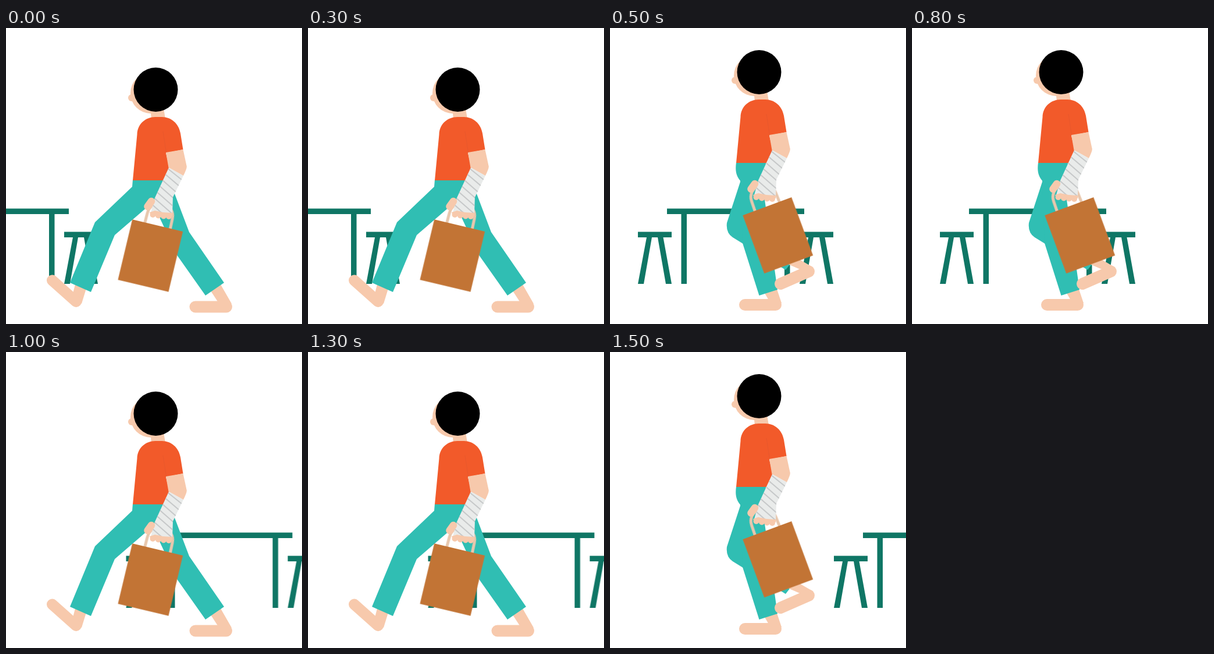
These frames come from a looping animation (509x509 px, 2000 ms). An HTML page:

```html
<!DOCTYPE html>
<html lang="en">
<head>
<meta charset="utf-8">
<title>Walking with a bag</title>
<style>
  html, body { margin: 0; width: 100%; height: 100%; overflow: hidden; background: #fff; }
  svg { display: block; width: 100%; height: 100%; }

  .skin { fill: #f7c9ac; }
  .limb { fill: none; stroke: #f7c9ac; stroke-linecap: round; }
  .pants { fill: #30beb3; }
  .shirt { fill: #f25a2a; }
  .wood { fill: #0f7665; }

  .room, .body, .bag, .stride, .pass { animation: 2s step-end infinite; }
  .room { animation-name: room; }
  .body { animation-name: bob; }
  .bag { animation-name: swing; }
  .stride { animation-name: blink; animation-duration: 1s; }
  .pass { animation-name: blink; animation-duration: 1s; animation-delay: -.5s; }
  .body, .bag { animation-duration: 1s; }

  @keyframes room {
    0% { transform: translate(-226px, 0); }
    25% { transform: translate(0, 0); }
    50% { transform: translate(158.5px, 0); }
    75%, 100% { transform: translate(337px, 0); }
  }
  @keyframes bob {
    0% { transform: translate(0, 0); }
    50%, 100% { transform: translate(-1px, -30px); }
  }
  @keyframes swing {
    0% { transform: translate(260.7px, 339.6px) rotate(13.4deg); }
    50%, 100% { transform: translate(270.2px, 306.6px) rotate(-20.3deg); }
  }
  @keyframes blink {
    0% { visibility: visible; }
    50%, 100% { visibility: hidden; }
  }
</style>
</head>
<body>
<svg viewBox="0 0 509 509">
  <defs>
    <path id="stool" d="M0 350.5H58V360H43.5L58 440H48L34 360H24L10 440H0L15 360H0Z"/>
    <path id="wrap" d="M280 240L305 254L287 291L286 319L249 317L256 292Z"/>
    <clipPath id="wrapClip"><use href="#wrap"/></clipPath>
  </defs>

  <g class="room wood">
    <use href="#stool" x="48"/>
    <use href="#stool" x="326"/>
    <path d="M98 310.5H334V320H309.5V440H300V320H132V440H122.5V320H98Z"/>
  </g>

  <g class="stride">
    <path class="skin" d="M119 441L138 448L130 474L113 464ZM352 452L369 441L388 474L378 482L365 472Z"/>
    <path class="limb" stroke-width="19" d="M79.5 434L120.500 470.500"/>
    <path class="limb" stroke-width="20" d="M325.500 479.500H379"/>
    <path class="pants" d="M218 261L217 273L153 334L110 438L146 454L187 356L252 300L295 392L343 460L375 438L315 351L290 285L278 255Z"/>
  </g>

  <g class="pass">
    <path class="pants" d="M217 231C215 246 217 255 224.500 263L201 335Q199 352 211 360L302 416L312 403L258 320Z"/>
    <path class="skin" d="M266 456L287 449L295 473L285 482L273 468ZM306 406L324 397L350 412L338 420Z"/>
    <path class="limb" stroke-width="20" d="M232 476H285"/>
    <path class="pants" d="M217 231H268L266 295L288 450L256.500 460L228 370L224 263Z"/>
    <path class="limb" stroke-width="20" d="M293 440L342 418.500"/>
  </g>

  <g class="body">
    <path class="skin" d="M248 138H271L274 156H250Z"/>
    <circle class="skin" cx="249" cy="112" r="35"/>
    <circle class="skin" cx="216" cy="120" r="6"/>
    <circle cx="257.500" cy="106" r="38"/>
    <path class="shirt" d="M218 262L225.500 183C226 165 240 153 257 153H268C284 153 297 164 300 181L304.500 209L275 215L281 240L270 262Z"/>
    <path d="M270 178L275.500 214" fill="none" stroke="#d95532" stroke-width=".7" opacity=".6"/>
  </g>

  <g class="bag">
    <path d="M-22.500 4L-22 -17A22 22 0 0 1 22 -17L22.500 4" fill="none" stroke="#e8c7ad" stroke-width="5"/>
    <rect x="-44.700" width="89.400" height="106.700" fill="#c27435"/>
  </g>

  <g class="body">
    <path class="skin" d="M275 214L304.500 209L310.800 238Q311 242 305 254L279.500 240Z"/>
    <use href="#wrap" fill="#e9ebea"/>
    <path clip-path="url(#wrapClip)" fill="none" stroke="#c6c8c9" stroke-width="2"
      d="M276 240l40 32M271 249l40 34M266 259l40 35M261 269l40 35M256 279l40 35M251 289l40 35M246 299l40 35"/>
    <path class="skin" d="M247 317L256 314L270 317L286 318V323L249 322Z"/>
    <g class="skin">
      <circle cx="252.500" cy="321" r="5"/>
      <circle cx="262" cy="322.500" r="5"/>
      <circle cx="271" cy="323.500" r="5"/>
      <circle cx="280" cy="324" r="5"/>
    </g>
    <path class="limb" stroke-width="12.500" d="M243.500 307L250 298"/>
  </g>
</svg>
</body>
</html>
```
